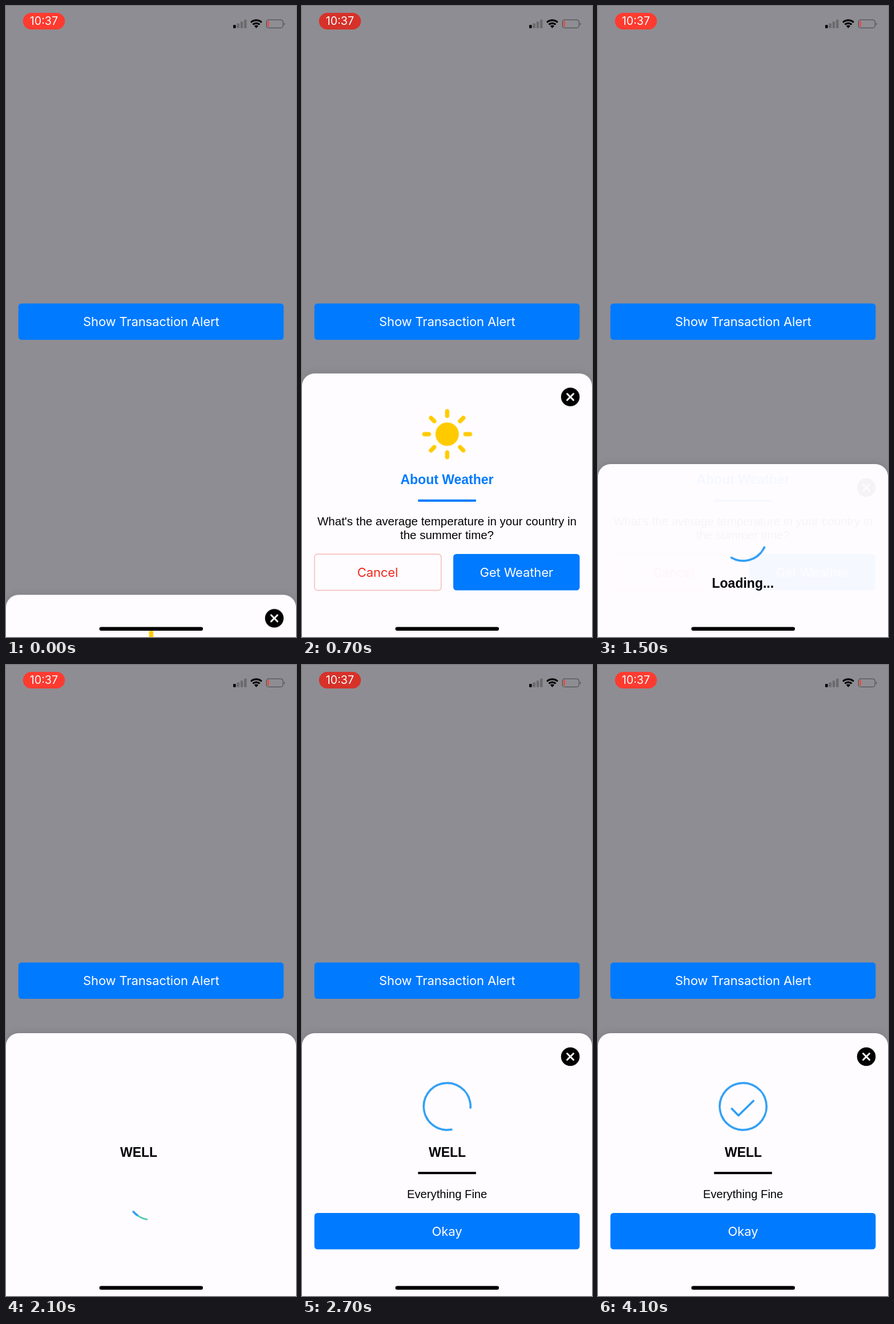
Write an HTML page that moves like this. It is 508 by 1102 pixels and loops after 4200 ms.

```html
<!DOCTYPE html>
<html lang="en">
<head>
<meta charset="utf-8">
<title>Transaction alert</title>
<style>
html, body { margin: 0; width: 100%; height: 100%; overflow: hidden; background: #8e8d93; }
svg { display: block; width: 508px; height: 1102px; }
text { white-space: pre; }

.btn { font: 22px Inter, "Open Sans", sans-serif; letter-spacing: -.006em; text-anchor: middle; fill: #fff; }
.title { font: bold 23px "Liberation Sans", Arial, sans-serif; }
.body { font: 20.5px "Liberation Sans", Arial, sans-serif; text-anchor: middle; }
.mid { text-anchor: middle; }
.blue { fill: #007aff; }
.arc { fill: none; stroke: #2b9cf5; stroke-width: 3.6; stroke-linecap: round; stroke-linejoin: round; }
.paper { fill: #fefcff; filter: drop-shadow(0 0 7px rgba(0, 0, 0, .12)); }

.anim { animation: 4.2s linear infinite; }

/* recording badge */
#pill { fill: #ff3b30; animation: pulse 2s ease-in-out infinite; }
@keyframes pulse {
  0%, 75%, 100% { fill: #ff3b30; }
  37.5% { fill: #d6322a; }
}

/* sheet edge: the entrance runs in 100 ms steps */
.sheet { animation-name: sheet; }
@keyframes sheet {
  0% { transform: translateY(1028.3px); animation-timing-function: step-end; }
  2.33% { transform: translateY(810px); animation-timing-function: step-end; }
  4.71% { transform: translateY(660px); animation-timing-function: step-end; }
  7.1%, 21.43% { transform: translateY(641.7px); animation-timing-function: ease-in-out; }
  28.1%, 43.33% { transform: translateY(800px); animation-timing-function: ease-in-out; }
  50%, 100% { transform: translateY(643px); }
}
#close { animation-name: close; }
@keyframes close {
  0%, 29.29% { opacity: 1; animation-timing-function: ease-in-out; }
  36.7%, 52.4% { opacity: 0; animation-timing-function: ease-in-out; }
  60.7%, 100% { opacity: 1; }
}

/* question */
#ask { animation-name: ask; }
@keyframes ask {
  0% { transform: translateY(386.6px); opacity: 1; animation-timing-function: step-end; }
  2.33% { transform: translateY(168.3px); opacity: 1; animation-timing-function: step-end; }
  4.71% { transform: translateY(18.3px); opacity: 1; animation-timing-function: step-end; }
  7.1%, 29.29% { transform: translateY(0); opacity: 1; animation-timing-function: ease-in-out; }
  36.7%, 100% { transform: translateY(0); opacity: 0; }
}
#sun { animation-name: sun; }
@keyframes sun {
  0%, 21.43% { transform: translateY(0) scale(1); opacity: 1; animation-timing-function: ease-in-out; }
  28.1%, 100% { transform: translateY(62px) scale(0); opacity: 0; }
}

/* loading */
#wait { animation-name: wait; }
@keyframes wait {
  0%, 29.29% { opacity: 0; }
  34.5%, 50.2% { opacity: 1; }
  54.5%, 100% { opacity: 0; }
}
#spin { animation-name: spin; }
@keyframes spin {
  0%, 29.286% { transform: rotate(-51deg); }
  54.762%, 100% { transform: rotate(625deg); }
}
#lead { animation-name: lead; }
@keyframes lead {
  0%, 29.286% { stroke-dasharray: 62 360; animation-timing-function: ease-out; }
  35.714% { stroke-dasharray: 95 360; animation-timing-function: ease-in-out; }
  50%, 100% { stroke-dasharray: 13 360; }
}
#trail { animation-name: trail; }
@keyframes trail {
  0%, 29.286% { stroke-dasharray: 74 360; animation-timing-function: ease-out; }
  35.714% { stroke-dasharray: 96 360; animation-timing-function: ease-in-out; }
  50%, 100% { stroke-dasharray: 39 360; }
}
#loading { animation-name: loading; }
@keyframes loading {
  0%, 29.29% { opacity: 0; }
  34.5%, 43.33% { opacity: 1; }
  43.34%, 100% { opacity: 0; }
}

/* result */
#well { animation-name: well; }
@keyframes well {
  0%, 43.33% { transform: translate(-22px, 157.5px); opacity: 0; }
  43.34% { transform: translate(-22px, 157.5px); opacity: 1; animation-timing-function: ease-in-out; }
  50%, 52.4% { transform: translate(-22px, 0); opacity: 1; animation-timing-function: ease-in-out; }
  58%, 100% { transform: translate(0, 0); opacity: 1; }
}
#result { animation-name: result; }
@keyframes result {
  0%, 52.4% { opacity: 0; animation-timing-function: ease-in-out; }
  60.7%, 100% { opacity: 1; }
}
#ring { animation-name: ring; }
@keyframes ring {
  0%, 52.38% { stroke-dasharray: 0 360; opacity: 0; }
  52.39% { stroke-dasharray: 0 360; opacity: 1; animation-timing-function: cubic-bezier(.333, .667, .667, 1); }
  74.52%, 100% { stroke-dasharray: 361 360; opacity: 1; }
}
#tick { animation-name: tick; }
@keyframes tick {
  0%, 74.52% { stroke-dasharray: 0 200; opacity: 0; }
  74.53% { stroke-dasharray: 0 200; opacity: 1; animation-timing-function: ease-out; }
  85.7%, 100% { stroke-dasharray: 101 200; opacity: 1; }
}
</style>
</head>
<body>
<svg viewBox="0 0 508 1102">
  <rect width="508" height="1102" fill="#8e8d93"/>

  <!-- status bar -->
  <rect id="pill" x="29.7" y="12" width="73.5" height="29" rx="14.5"/>
  <text x="66.4" y="33.3" class="mid" fill="#fff" font-family="Inter, sans-serif" font-size="19.6">10:37</text>
  <rect x="398" y="33" width="4.6" height="5.7" rx="1"/>
  <g opacity=".24">
    <rect x="404.4" y="30.3" width="4.6" height="8.4" rx="1"/>
    <rect x="410.7" y="27.2" width="4.6" height="11.5" rx="1"/>
    <rect x="417" y="23.7" width="4.6" height="15" rx="1"/>
  </g>
  <g transform="translate(438.4 38.8)">
    <path d="M0 0L-3.6-3.8A5.2 5.2 0 0 1 3.6-3.8Z"/>
    <path d="M-6-6.4A8.8 8.8 0 0 1 6-6.4M-9.4-10.2A13.9 13.9 0 0 1 9.4-10.2" fill="none" stroke="#000" stroke-width="3.2"/>
  </g>
  <rect x="456.2" y="24.1" width="29" height="14.2" rx="4" fill="none" stroke="#000" stroke-opacity=".42" stroke-width="1.3"/>
  <path d="M487 29.2q3 2 0 4.6z" fill-opacity=".5"/>
  <rect x="458.3" y="26.3" width="2.3" height="9.8" rx="1" fill="#ff3b30"/>

  <rect x="21.7" y="519.5" width="464.7" height="63.5" rx="5.5" class="blue"/>
  <text x="254.3" y="559.3" class="btn">Show Transaction Alert</text>

  <g class="anim sheet">
    <rect width="508" height="520" rx="22" class="paper"/>
  </g>

  <g id="ask" class="anim">
    <g transform="translate(254.3 747.7)">
      <g id="sun" class="anim" fill="#ffcb00" stroke="#ffcb00" stroke-width="7.4" stroke-linecap="round">
        <circle r="20.5" stroke="none"/>
        <path id="rays" d="M0-32v-8M0 32v8M32 0h8M-32 0h-8"/>
        <use href="#rays" transform="rotate(45)"/>
      </g>
    </g>
    <text x="254" y="835.3" class="title mid blue">About Weather</text>
    <rect x="203.3" y="861.8" width="101.5" height="4" class="blue"/>
    <text x="254" y="907" class="body">What's the average temperature in your country in</text>
    <text x="254" y="931.3" class="body">the summer time?</text>
    <rect x="22" y="957.2" width="221.7" height="63.3" rx="5" fill="none" stroke="#f6b9b3" stroke-width="1.4"/>
    <text x="132.4" y="996.5" class="btn" style="fill:#f1271c">Cancel</text>
    <rect x="265" y="957" width="221.4" height="63.5" rx="5.5" class="blue"/>
    <text x="375.8" y="996.5" class="btn">Get Weather</text>
  </g>

  <g id="wait" class="anim">
    <g transform="translate(254.2 928)">
      <g id="spin" class="anim">
        <g transform="scale(1 -1)">
          <circle id="trail" class="anim arc" r="41" pathLength="360" style="stroke:#43c3ae;stroke-width:2.6"/>
          <circle id="lead" class="anim arc" r="41" pathLength="360"/>
        </g>
      </g>
    </g>
  </g>
  <text id="loading" class="anim title" x="199.5" y="1016">Loading...</text>

  <text id="well" class="anim title" x="222" y="858.6">WELL</text>
  <g transform="translate(254.2 771)">
    <circle id="ring" class="anim arc" r="41" pathLength="360" transform="rotate(79)"/>
    <path id="tick" class="anim arc" d="M-19.8 4L-8.2 15.8L18-9.8" pathLength="100"/>
  </g>
  <g id="result" class="anim">
    <rect x="203.3" y="885.2" width="101.5" height="4"/>
    <text x="254.2" y="930.8" class="body" style="font-size:20.2px">Everything Fine</text>
    <rect x="21.7" y="957" width="464.7" height="63.5" rx="5.5" class="blue"/>
    <text x="254" y="996.5" class="btn">Okay</text>
  </g>

  <g id="close" class="anim">
    <g class="anim sheet">
      <circle cx="470" cy="41" r="16.3"/>
      <path d="M464.5 35.5l11 11m0-11l-11 11" stroke="#fff" stroke-width="3" stroke-linecap="round"/>
    </g>
  </g>

  <rect x="163.5" y="1084.5" width="181.5" height="6.6" rx="3.3"/>
</svg>
</body>
</html>
```
